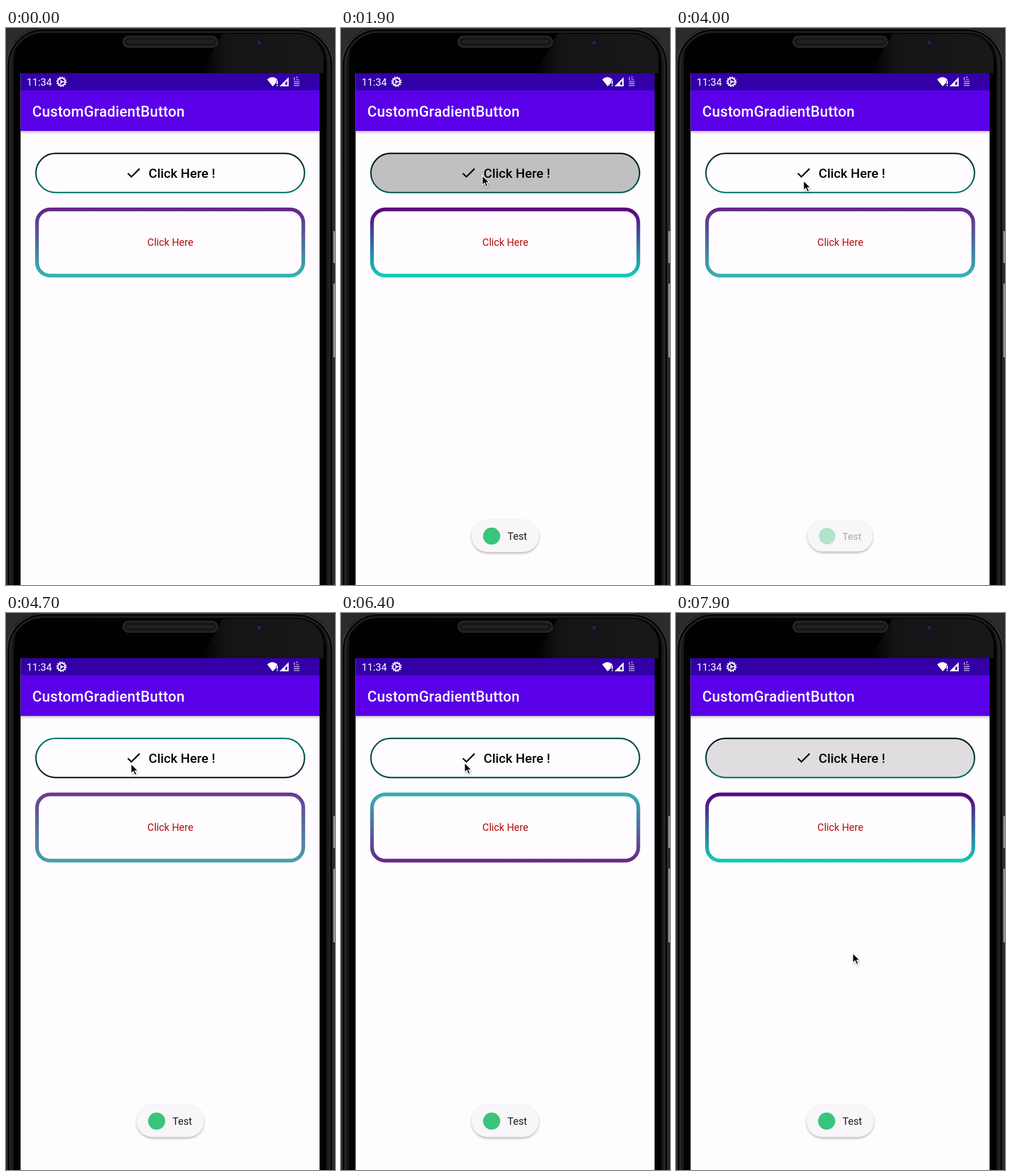
An HTML page that plays this animation: 575 by 974 pixels, repeating every 8 s.

```html
<!DOCTYPE html>
<html lang="en">
<head>
<meta charset="utf-8">
<title>Gradient button</title>
<style>
  html, body { margin: 0; width: 100%; height: 100%; overflow: hidden; background: #2b2c2e; }
  svg { display: block; width: 575px; height: 974px; font-family: Roboto, "Open Sans", sans-serif; }
  .text { font-size: 17.75px; }
</style>
</head>
<body>
<svg viewBox="0 0 575 974">
  <defs>
    <linearGradient id="rim" x1="0" x2="1">
      <stop offset="0" stop-color="#0b0b0c"/>
      <stop offset=".009" stop-color="#222224"/>
      <stop offset=".022" stop-color="#161617"/>
      <stop offset=".03" stop-color="#030303"/>
      <stop offset=".965" stop-color="#050505"/>
      <stop offset=".982" stop-color="#1b1b1d"/>
      <stop offset="1" stop-color="#0c0c0d"/>
    </linearGradient>
    <linearGradient id="glass" x1="0" x2="1">
      <stop offset="0" stop-color="#1d1b1f" stop-opacity="0"/>
      <stop offset=".2" stop-color="#1d1b1f" stop-opacity=".7"/>
      <stop offset="1" stop-color="#19171a"/>
    </linearGradient>
    <linearGradient id="barShade" x2="0" y2="1">
      <stop offset="0" stop-color="#000" stop-opacity=".2"/>
      <stop offset="1" stop-color="#000" stop-opacity="0"/>
    </linearGradient>
    <linearGradient id="key" x1="0" x2="1">
      <stop offset="0" stop-color="#777"/>
      <stop offset="1" stop-color="#b5b5b5"/>
    </linearGradient>
    <linearGradient id="pillLine" gradientUnits="userSpaceOnUse" x1="0" x2="0" y1="218" y2="289">
      <stop offset="0"/><stop offset="1"/>
    </linearGradient>
    <linearGradient id="boxLine" gradientUnits="userSpaceOnUse" x1="0" x2="0" y1="314" y2="436">
      <stop offset="0"/><stop offset="1"/>
    </linearGradient>
    <radialGradient id="wave" gradientUnits="userSpaceOnUse" cx="290" cy="254" r="205">
      <stop offset="0" stop-color="#000"/>
      <stop offset=".5" stop-color="#000"/>
      <stop offset="1" stop-color="#000" stop-opacity="0"/>
    </radialGradient>
    <filter id="soft" x="-20%" y="-30%" width="140%" height="170%">
      <feGaussianBlur stdDeviation="2"/>
    </filter>
  </defs>

  <!-- phone body -->
  <rect width="575" height="974" fill="#2b2c2e"/>
  <rect x="0" y="-1" width="573" height="1100" rx="66" fill="url(#rim)"/>
  <g fill="none">
    <rect x="1.5" y="1" width="570" height="1100" rx="64" stroke="#4a4a4c" stroke-width="1.4"/>
    <rect x="4.5" y="4" width="564" height="1100" rx="61" stroke="#0a0a0a" stroke-width="3"/>
    <rect x="7.5" y="7" width="558" height="1100" rx="58" stroke="#29292b" stroke-width="2"/>
  </g>
  <rect x="14" y="10" width="546" height="1100" rx="54" fill="#010101"/>
  <path d="M340 79L378 10H505Q546 10 555 50V79Z" fill="url(#glass)"/>
  <rect x="204.5" y="14.5" width="165" height="19" rx="9.5" fill="#1b1b1c" stroke="#333335" stroke-width="1.5"/>
  <rect x="210" y="20" width="155" height="8" rx="4" fill="#202021" stroke="#0c0c0c"/>
  <circle cx="443" cy="26" r="7" fill="#121219"/>
  <circle cx="443" cy="26" r="4" fill="#1d1d3c"/>
  <circle cx="442" cy="25" r="1.5" fill="#34345e"/>
  <rect x="572" y="355" width="4" height="56" rx="1" fill="url(#key)"/>
  <rect x="572" y="447" width="4" height="129" rx="1" fill="url(#key)"/>

  <!-- screen -->
  <rect x="25.5" y="79" width="522.5" height="895" fill="#fefcfe"/>
  <rect x="25.5" y="180" width="522.5" height="6" fill="url(#barShade)"/>
  <rect x="25.5" y="109" width="522.5" height="71" fill="#5a00e8"/>
  <rect x="25.5" y="79" width="522.5" height="30" fill="#3300a8"/>
  <g fill="#fff">
    <text class="text" x="36" y="100.5">11:34</text>
    <text x="46" y="154.5" font-size="25.4" font-weight="500" letter-spacing=".3">CustomGradientButton</text>
    <g fill="none" stroke="#fff" transform="translate(97 94)">
      <circle r="6.4" stroke-width="2"/>
      <circle r="8.1" stroke-width="2" stroke-dasharray="2.2 2.04"/>
      <path d="M0 0H6M0 0L-3 -5.2M0 0L-3 5.2" stroke-width="1.4"/>
      <circle r="1.4" stroke-width="1.4"/>
    </g>
    <path d="M456.5 90Q465.500 82 474.500 90L472 93V96L466 102Z"/>
    <path d="M473 92h2v6h-2zM473 99.500h2v2h-2z"/>
    <path d="M494 86V102H478Z"/>
    <path d="M491.500 92.500V99.500H488V96Z" fill="#3300a8"/>
    <g fill="#a58fd8">
      <path d="M503 86h2v5h-2zM507 85h3v2h-3zM507 89h5v1.500h-5z"/>
      <path d="M503 92.500h10v2h-10zM503 96h10v2h-10zM503 99.500h10v2h-10z"/>
    </g>
  </g>

  <!-- buttons -->
  <rect x="52.25" y="219.25" width="469.5" height="68.5" rx="34.25" fill="none" stroke="url(#pillLine)" stroke-width="2.5"/>
  <rect id="press" x="51" y="218" width="472" height="71" rx="35.5" opacity="0"/>
  <path transform="translate(207.700 238) scale(1.268)" d="M9 16.170L4.830 12l-1.420 1.410L9 19 21 7l-1.410-1.410z"/>
  <text x="249.300" y="262" font-size="22.8" font-weight="500">Click Here !</text>
  <rect x="54.2" y="317.2" width="465.4" height="115.8" rx="23" fill="none" stroke="url(#boxLine)" stroke-width="6.4"/>
  <text class="text" x="287.200" y="381.300" text-anchor="middle" fill="#b50d0d">Click Here</text>

  <!-- toast -->
  <g id="toast">
    <rect x="228.500" y="862.500" width="117" height="56" rx="28" opacity=".32" filter="url(#soft)"/>
    <rect x="228" y="860.500" width="118" height="56" rx="28" fill="#f8f6f9"/>
    <g id="note">
      <circle cx="263.300" cy="888.500" r="15" fill="#3bc47b"/>
      <text class="text" x="291" y="895.300" fill="#1c1c1c">Test</text>
    </g>
  </g>

  <g id="cursor">
    <path d="M1 2V19L5 15.500L8 22L11 20.500L8 14H13Z" opacity=".3" filter="url(#soft)"/>
    <path d="M0 0V16.500L3.900 13L6.700 19.500L9.600 18.200L6.800 12H12Z" stroke="#fff" stroke-width="1.2"/>
  </g>
</svg>
<script>
const LOOP = 8000;
const $ = id => document.getElementById(id);
const lerp = (a, b, p) => a + (b - a) * p;

// keys: [time, value, time, value, ...], linear between them
function track(keys, t) {
  let i = 0;
  while (i + 2 < keys.length && keys[i + 2] <= t) i += 2;
  if (t <= keys[0] || i + 2 >= keys.length) return keys[t <= keys[0] ? 1 : i + 1];
  return lerp(keys[i + 1], keys[i + 3], (t - keys[i]) / (keys[i + 2] - keys[i]));
}

const pill = { id: 'pillLine', a: [0, 0, 0], b: [0, 155, 140], lift: [4, 0, 0],
  period: 2000, keys: [0, .2, 500, .6, 900, 1, 1050, 1, 1200, .86, 1450, 0, 1600, 0, 2000, .2] };
const box = { id: 'boxLine', a: [92, 0, 127], b: [16, 206, 185], lift: [48, 8, 2],
  period: 1000, keys: [0, .14, 200, .5, 390, .86, 500, .65, 820, 0, 920, 0, 1000, .14] };

const X = [300, 560, 700, 340, 1100, 247, 3200, 247, 3800, 223, 4200, 223, 5000, 216, 6500, 216, 7100, 214, 7400, 214, 7900, 309];
const Y = [300, 612, 700, 420, 1100, 258, 3200, 258, 3800, 267, 4200, 267, 5000, 262, 6500, 262, 7100, 253, 7400, 253, 7900, 595];
const PRESS = [1150, 0, 1250, .24, 3100, .24, 3400, 0, 7050, 0, 7200, .28, 7400, .26, 7600, .24, 7900, .12, 8000, .08];
const TOAST = [1300, 0, 1500, 1, 3900, 1, 4000, .36, 4100, 0, 4200, 0, 4400, 1, 6450, 1, 6700, 0, 7400, 0, 7600, 1];

function blend(a, b, lift, p) {
  return `rgb(${a.map((v, i) => Math.round(lerp(v, b[i], p) + 4 * p * (1 - p) * lift[i]))})`;
}

function paintLine({ id, a, b, lift, period, keys }, t) {
  const p = track(keys, t % period);
  const [top, bottom] = $(id).children;
  top.setAttribute('stop-color', blend(a, b, lift, p));
  bottom.setAttribute('stop-color', blend(b, a, lift, p));
}

function draw(t) {
  paintLine(pill, t);
  paintLine(box, t);

  $('press').setAttribute('opacity', track(PRESS, t));
  $('press').setAttribute('fill', t > 7000 && t < 7400 ? 'url(#wave)' : '#000');
  $('wave').setAttribute('r', track([7050, 60, 7200, 205, 7400, 480], t));

  const shown = track(TOAST, t);
  const size = lerp(.945, 1, shown);
  $('toast').setAttribute('transform', `translate(287 888.5) scale(${size}) translate(-287 -888.5)`);
  $('toast').setAttribute('opacity', Math.min(1, shown * 3));
  $('note').setAttribute('opacity', shown);

  $('cursor').setAttribute('transform', `translate(${track(X, t)} ${track(Y, t)})`);
  $('cursor').setAttribute('visibility', t < 300 ? 'hidden' : 'visible');
}

const start = performance.now();
function tick() {
  const t = (performance.now() - start) % LOOP;
  draw(Math.floor(t / 100) * 100);
  requestAnimationFrame(tick);
}
tick();
</script>
</body>
</html>
```
